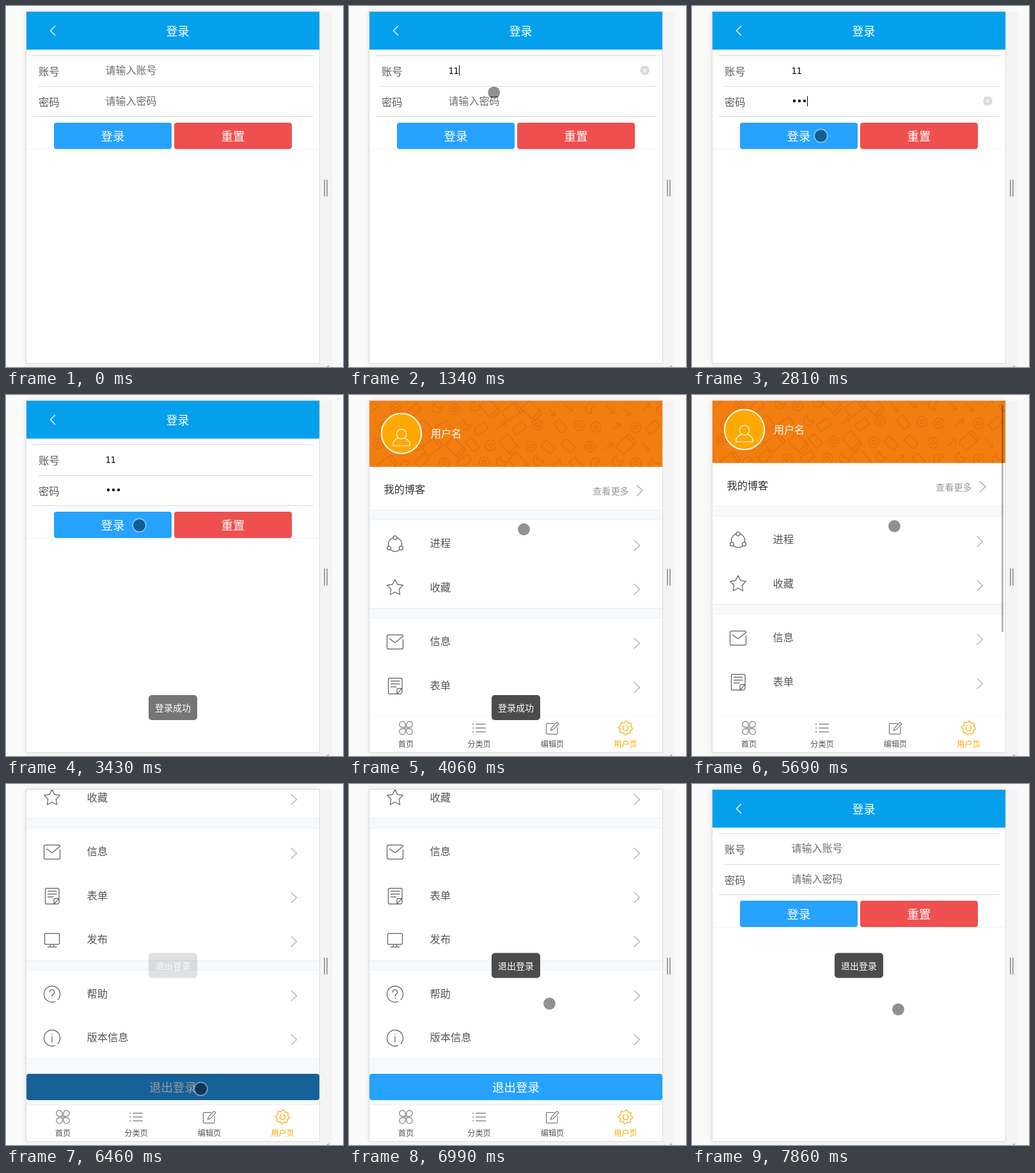
An HTML page that plays this animation: 527 by 563 pixels, repeating every 8000 ms.

```html
<!DOCTYPE html>
<html lang="zh">
<head>
<meta charset="utf-8">
<style>
html, body { margin: 0; width: 100%; height: 100%; overflow: hidden; background: #fafafa; }
svg { display: block; font-family: "Noto Sans CJK SC", "Noto Sans CJK", "Noto Sans", sans-serif; }
.icon { fill: none; stroke: #5c5c60; stroke-width: 1.2; stroke-linecap: round; stroke-linejoin: round; }
</style>
</head>
<body>
<svg id="stage" width="527" height="563" viewBox="0 0 527 563"></svg>
<script>
const LOOP = 8000, MAX = 279;

// ---- markup helpers ----
const rect = (x, y, w, h, fill, extra = '') =>
  `<rect x="${x}" y="${y}" width="${w}" height="${h}" fill="${fill}" ${extra}/>`;
const text = (x, cy, size, fill, s, anchor = 'start') =>
  `<text x="${x}" y="${cy + size * 0.37}" font-size="${size}" fill="${fill}" text-anchor="${anchor}">${s}</text>`;
const path = (d, extra = '') => `<path d="${d}" ${extra}/>`;
const circle = (x, y, r, extra = '') => `<circle cx="${x}" cy="${y}" r="${r}" ${extra}/>`;
const group = (id, body, extra = '') => `<g id="${id}" ${extra}>${body}</g>`;
const icon = (x, y, body, color) =>
  `<g class="icon" transform="translate(${x} ${y})" ${color ? `style="stroke:${color}"` : ''}>${body}</g>`;
const arrow = (x, y) => icon(x, y, path('M-4 -8L4.5 0L-4 8'), '#a0a5a5');

function button(id, x, y, w, fill, label) {
  return rect(x, y, w, 41, fill, 'rx="4"') + text(x + w / 2, y + 21, 18.5, '#fff', label, 'middle') +
    rect(x, y, w, 41, '#000', `rx="4" id="${id}" opacity="0"`);
}

function toast(id, y, label) {
  return group(id, rect(223, y, 76, 39, '#000', 'rx="5" fill-opacity=".7"') +
    text(261, y + 20, 14, '#fff', label, 'middle'));
}

function polar(n, radius) {
  return 'M' + Array.from({ length: n }, (_, i) => {
    const a = i * 2 * Math.PI / n - Math.PI / 2, r = radius(i);
    return (r * Math.cos(a)).toFixed(2) + ' ' + (r * Math.sin(a)).toFixed(2);
  }).join('L') + 'Z';
}

// ---- icons ----
const ICONS = {
  share: path('M-2.8 -9.8A11 11 0 0 0 -10.5 2.6M2.8 -9.8A11 11 0 0 1 10.5 2.6M-7.2 9A11 11 0 0 0 7.2 9') +
    circle(0, -9.5, 3) + circle(-9.5, 6.5, 3) + circle(9.5, 6.5, 3),
  star: path(polar(10, i => i % 2 ? 6.6 : 13)),
  mail: path('M12.5 -3V9Q12.5 11.5 10 11.5H-10Q-12.5 11.5 -12.5 9V-8Q-12.5 -10.5 -10 -10.5H10.5Q12.5 -10.5 12.5 -8.5L0 1.5L-8.5 -4.5'),
  form: path('M11 4V-10Q11 -12 9 -12H-8.5Q-10.5 -12 -10.5 -10V10.5Q-10.5 12.5 -8.5 12.5H3L11 4H5Q3 4 3 6V12.5H8Q11 12.5 11 9V4M-6.5 -7.5H7M-6.5 -3H7M-6.5 1.5H2'),
  screen: path('M-9.5 -10H9.5Q11.5 -10 11.5 -8V5Q11.5 7 9.5 7H-9.5Q-11.5 7 -11.5 5V-8Q-11.5 -10 -9.5 -10M-2 7L-3 10.5M2 7L3 10.5M-7 11H7'),
  help: path('M4.5 11.7A12.5 12.5 0 1 1 9 8.7M-3.7 -3A3.7 3.7 0 1 1 1.6 .2Q0 1 0 3.5M0 6.6V6.8'),
  info: path('M4.5 11.7A12.5 12.5 0 1 1 9 8.7M0 -2.5V6.5M0 -6V-5.8'),
  home: [0, 90, 180, 270].map(a =>
    path('M1 1H6A4.6 4.6 0 1 1 1 6Z', `transform="rotate(${a})"`)).join(''),
  list: path('M-5 -6H10M-5 0H10M-5 6H10M-10 -6H-8.5M-10 0H-8.5M-10 6H-8.5'),
  edit: path('M3 -7H-8Q-9.5 -7 -9.5 -5.5V8Q-9.5 9.5 -8 9.5H6.5Q8 9.5 8 8V-1M-2.5 4L-1.5 0L7 -9L10 -6.5L1.5 2.5Z'),
  gear: path(polar(32, i => i % 4 < 2 ? 10.7 : 8.7)) + path('M1.5 -3.8A4.1 4.1 0 1 1 -2 -3.6')
};

// ---- login page ----
function field(y, label, hint, id, value) {
  return text(51, y + 2, 16.3, '#5c5c5c', label) +
    `<g id="${id}Hint" font-weight="300">${text(155.5, y, 16, '#6e6e6e', hint)}</g>` + value +
    group(id + 'Clear', circle(462.5, y + .3, 7.4, 'fill="#dcdcdc"') +
      path(`M460 ${y - 2.2}l5 5m0 -5l-5 5`, 'stroke="#fff" stroke-width="1.1"'));
}

function loginPage() {
  const line = (x, y, color = '#d9d9d9') => rect(x, y, 481 - x, 1, color);
  return rect(32, 9, 458, 548, '#fff') + rect(32, 9, 458, 59, '#04a0ec') +
    path('M77 31L69.5 38.5L77 46', 'fill="none" stroke="#fff" stroke-width="1.3"') +
    text(268.5, 39, 18, '#fff', '登录', 'middle') +
    line(41, 77) + line(51, 125) + line(41, 172) + rect(32, 223, 458, 1, '#f2f2f2') +
    field(100, '账号', '请输入账号', 'user',
      `<text id="name" x="155.5" y="106" font-size="13.3" font-family="DejaVu Sans Mono, monospace"></text>`) +
    field(148, '密码', '请输入密码', 'pass',
      group('dots', [0, 1, 2].map(i => circle(160 + 8 * i, 148, 2.2)).join(''))) +
    rect(0, 0, 1, 16, '#000', 'id="caret"') +
    button('loginPress', 75, 182, 184, '#26a2ff', '登录') +
    button('', 263, 182, 184, '#ef4f4f', '重置');
}

// ---- user page ----
function doodles() {
  let seed = 11, out = '';
  const rnd = () => (seed = seed * 16807 % 2147483647) / 2147483647;
  const kinds = [
    '<rect x="-14" y="-9" width="28" height="18" rx="3"/><path d="M9 -9V9"/>',
    '<circle r="8"/><circle r="3"/>',
    '<rect x="-10" y="-6" width="20" height="12" rx="2"/>',
    '<path d="M4 -8A8 8 0 1 0 8 4A7 7 0 0 1 4 -8Z"/>',
    '<path d="M-9 0H9M4 -5L9 0L4 5"/>'
  ];
  for (let row = 0; row < 4; row++)
    for (let col = 0; col < 16; col++) {
      const x = 40 + col * 30 + (row % 2) * 14 + rnd() * 8, y = 18 + row * 28 + rnd() * 8;
      const turn = (rnd() < .6 ? -45 : 40) + rnd() * 12;
      out += `<g transform="translate(${x.toFixed(1)} ${y.toFixed(1)}) rotate(${turn.toFixed(0)})">${kinds[Math.floor(rnd() * 5)]}</g>`;
    }
  return `<g clip-path="url(#banner)" fill="none" stroke="#d9660a" stroke-opacity=".5" stroke-width="1.8">${out}</g>`;
}

function userPage() {
  const gap = (y, h) => rect(32, y, 458, h, '#f6fafd') +
    rect(32, y - 1, 458, 1, '#eaeef1') + rect(32, y + h - 1, 458, 1, '#eef1f4');
  const row = (y, label, name) =>
    icon(72, y + 1.2, ICONS[name]) + text(126.5, y, 16.3, '#555', label) + arrow(450, y + 3.6);
  const body = rect(32, 9, 458, 830, '#fff') + rect(32, 9, 458, 103, '#f37e10') + doodles() +
    circle(82, 60, 31.2, 'fill="#ffa900" stroke="#fff" stroke-width="2"') +
    icon(82, 65, circle(0, -4, 7.6) + path('M-4.5 2.3Q-13.5 5 -13.5 14H13.5Q13.5 5 4.5 2.3'), '#fff') +
    text(128, 60, 16, '#fff', '用户名') +
    text(54.5, 147, 16.2, '#333', '我的博客') + text(381, 150, 14.2, '#999', '查看更多') + arrow(454.5, 149) +
    gap(180, 15) + row(231, '进程', 'share') + row(299.5, '收藏', 'star') +
    gap(333, 15) + row(383.5, '信息', 'mail') + row(452.5, '表单', 'form') + row(521, '发布', 'screen') +
    gap(555, 15) + row(605.5, '帮助', 'help') + row(674, '版本信息', 'info') +
    gap(708, 130) + button('exitPress', 32, 731, 458, '#26a2ff', '退出登录');
  const tab = (i, name, label, color) =>
    icon(89 + i * 114.5, 519.3, ICONS[name], color || '#777') +
    text(89 + i * 114.5, 544.5, 12.2, color || '#555', label, 'middle');
  return group('scroll', body) +
    rect(32, 499, 458, 2, '#000', 'opacity=".02"') + rect(32, 501, 458, 56, '#fff') +
    tab(0, 'home', '首页') + tab(1, 'list', '分类页') + tab(2, 'edit', '编辑页') + tab(3, 'gear', '用户页', '#ffa800') +
    rect(484, 11, 3, 355, '#000', 'id="bar" rx="1.5"');
}

document.getElementById('stage').innerHTML =
  `<defs><clipPath id="view">${rect(32, 9, 458, 548, '#000')}</clipPath>
  <clipPath id="banner">${rect(32, 9, 458, 103, '#000')}</clipPath>
  <filter id="soft" x="-10%" y="-10%" width="120%" height="120%"><feGaussianBlur stdDeviation="4"/></filter></defs>` +
  rect(0, 0, 527, 563, '#fafafa') +
  rect(32, 9, 458, 548, '#000', 'opacity=".14" filter="url(#soft)"') +
  rect(490, 9, 20, 554, '#f4f4f4') + rect(32, 557, 478, 6, '#f3f3f3') +
  rect(31, 8, 460, 550, '#dcdcdc') +
  rect(497, 271, 2, 26, '#a0a0a0') + rect(501, 271, 2, 26, '#a0a0a0') +
  path('M502 563L505 561', 'stroke="#999" stroke-width="1.5"') +
  `<g clip-path="url(#view)">${group('login', loginPage())}${group('home', userPage())}
  ${toast('okToast', 468, '登录成功')}${toast('byeToast', 263.5, '退出登录')}</g>` +
  group('cursor', circle(0, 0, 9.5, 'fill="#000" fill-opacity=".43"') +
    circle(0, 0, 10.4, 'fill="none" stroke="#fff" stroke-opacity=".38" stroke-width="1.8"'));

// ---- motion ----
const el = {};
document.querySelectorAll('[id]').forEach(n => { if (n.id) el[n.id] = n; });
const show = (n, on) => n.setAttribute('display', on ? 'inline' : 'none');
const within = (t, a, b) => t >= a && t < b;
const ramp = (t, a, b) => Math.min(1, Math.max(0, (t - a) / (b - a)));

// Keys are [time, value, value...]; each segment eases in and out.
function track(t, keys) {
  let i = 0;
  while (i < keys.length - 2 && t >= keys[i + 1][0]) i++;
  const [a, b] = [keys[i], keys[i + 1]];
  const u = ramp(t, a[0], b[0]), k = u * u * (3 - 2 * u);
  return a.slice(1).map((v, j) => v + (b[j + 1] - v) * k);
}

const POINTER = [
  [180, 353.5, 341.5], [800, 230, 103], [1270, 230, 103], [1430, 222, 180], [1570, 210, 146.5],
  [2480, 210, 146.5], [2780, 201.5, 202.5], [3300, 201.5, 202.5], [3980, 273.5, 209.5], [4100, 273.5, 209.5],
  [4450, 318.5, 302.5], [5200, 318.5, 302.5], [5500, 316.5, 204.5], [5950, 316.5, 204.5],
  [6380, 304.5, 475.5], [6540, 304.5, 475.5], [6990, 313.5, 342.5], [7590, 313.5, 342.5], [7860, 322.5, 351.5]
];
const SCROLL = [[4520, 0], [4980, MAX], [5300, MAX], [5690, 6], [5740, 0], [5800, 0], [6180, MAX], [7390, MAX]];

function draw(t) {
  const home = within(t, 3910, 7390), reset = t >= 7390;
  show(el.login, !home);
  show(el.home, home);

  const typed = reset ? 0 : (t >= 1060) + (t >= 1200);
  const dots = reset ? 0 : (t >= 2270) + (t >= 2350) + (t >= 2430);
  el.name.textContent = '1'.repeat(typed);
  show(el.userHint, !typed);
  show(el.passHint, !dots);
  [...el.dots.children].forEach((d, i) => show(d, i < dots));
  show(el.userClear, within(t, 1060, 1720));
  show(el.passClear, within(t, 2270, 3050));
  const second = t >= 1720;
  show(el.caret, within(t, 800, 3050));
  el.caret.setAttribute('x', 156 + 8 * (second ? dots : typed));
  el.caret.setAttribute('y', second ? 140.5 : 92.5);
  el.loginPress.setAttribute('opacity', within(t, 3050, 3170) ? .4 : 0);

  const [y] = track(t, SCROLL);
  el.scroll.setAttribute('transform', `translate(0 ${-y})`);
  el.bar.setAttribute('y', 11 + y * .652);
  el.bar.setAttribute('opacity', .28 * (t >= 4530) * (1 - ramp(t, 6230, 6420)));
  el.exitPress.setAttribute('opacity', within(t, 6420, 6550) ? .4 : 0);

  el.okToast.setAttribute('opacity', ramp(t, 3200, 3500) * (1 - ramp(t, 5000, 5300)));
  el.byeToast.setAttribute('opacity', ramp(t, 6410, 6710));

  show(el.cursor, t >= 180);
  el.cursor.setAttribute('transform', `translate(${track(t, POINTER).join(' ')})`);
}

const start = performance.now();
function tick() {
  draw((performance.now() - start) % LOOP);
  requestAnimationFrame(tick);
}
tick();
</script>
</body>
</html>
```
